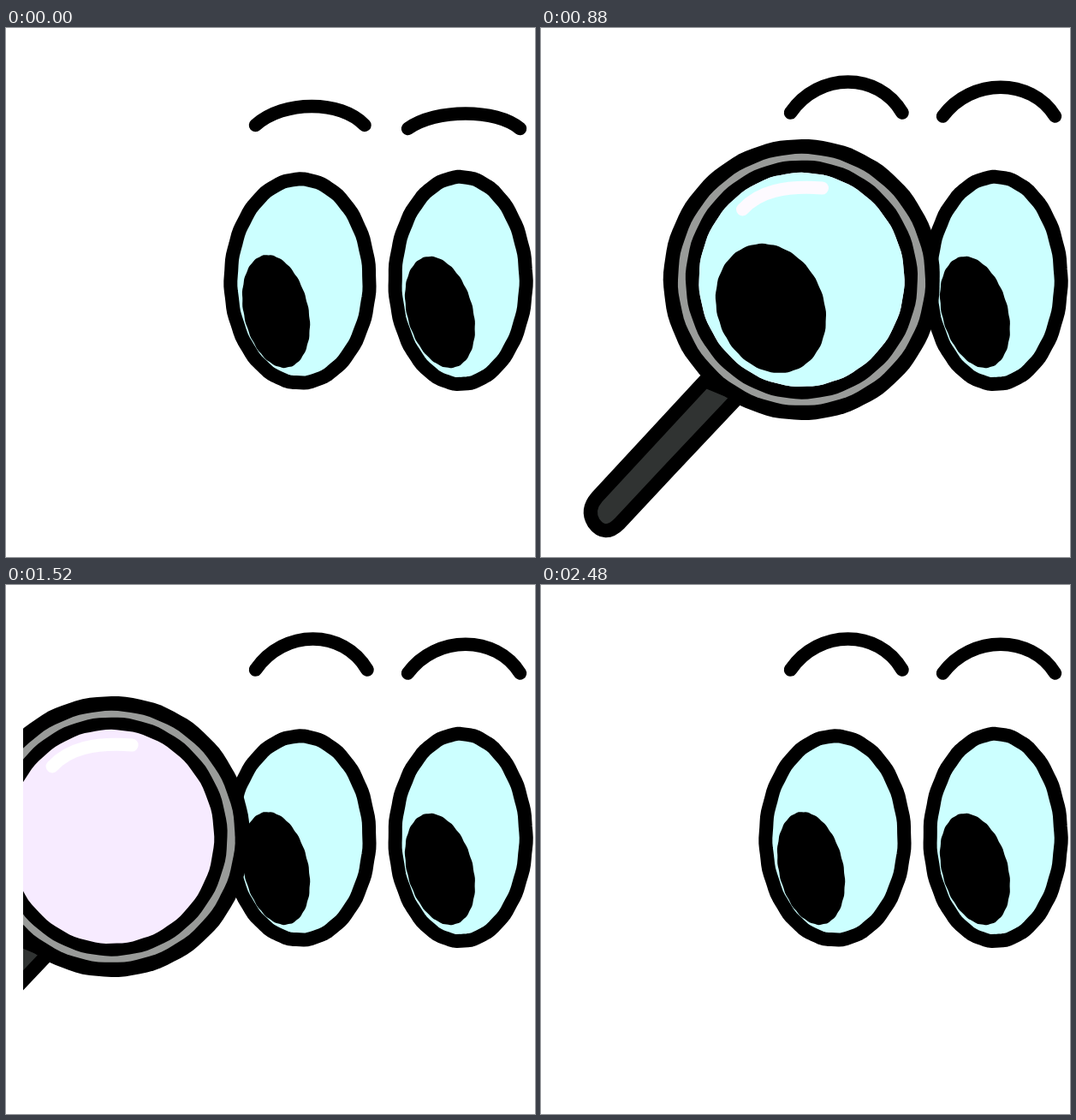
Recreate the animation shown at these times as an HTML page with a canvas. Size 618x618 px, loop 2560 ms.

```html
<!DOCTYPE html>
<html>
<head>
<meta charset="utf-8">
<style>
  html, body { margin: 0; width: 100%; height: 100%; overflow: hidden; background: #fff; }
  canvas { display: block; }
</style>
</head>
<body>
<canvas id="stage" width="618" height="618"></canvas>
<script>
const ctx = document.getElementById('stage').getContext('2d');
const STEP = 80, STEPS = 32, TRAVEL = 45.35;
const CYAN = '#ccffff', LILAC = '#f7ebff', GRAY = '#999b99', DARK = '#303332';
const mix = (a, b, k) => a + (b - a) * k;

// Ellipse with a faint hand-drawn wobble
function oval(cx, cy, rx, ry, tilt = 0) {
  const path = new Path2D(), c = Math.cos(tilt), s = Math.sin(tilt);
  for (let i = 0; i < 120; i++) {
    const a = i * Math.PI / 60;
    const w = 0.3 * Math.sin(23 * a + rx);
    const x = (rx + w) * Math.cos(a), y = (ry + w) * Math.sin(a);
    path.lineTo(cx + x * c - y * s, cy + x * s + y * c);
  }
  path.closePath();
  return path;
}

// Closed curve rounded through the midpoints of its corners
function blob(points) {
  const path = new Path2D(), n = points.length;
  for (let i = 0; i <= n; i++) {
    const [x, y] = points[i % n], [nx, ny] = points[(i + 1) % n];
    const mx = (x + nx) / 2, my = (y + ny) / 2;
    if (i) path.quadraticCurveTo(x, y, mx, my);
    else path.moveTo(mx, my);
  }
  path.closePath();
  return path;
}

function paint(path, fill, stroke, width) {
  if (fill) { ctx.fillStyle = fill; ctx.fill(path); }
  if (stroke) { ctx.strokeStyle = stroke; ctx.lineWidth = width; ctx.stroke(path); }
}

const eyes = [
  [oval(343.5, 295.5, 81, 119), oval(315.5, 331, 37.6, 67, -0.22)],
  [oval(531, 295, 76.5, 121), oval(507, 332, 38.2, 66.7, -0.27)]
];
const handle = new Path2D('M-113 118L-239 254Q-252 269-243 284Q-230 302-213 285L-156 224L-72 135Z');
const rings = [[161.5, 164, '#000'], [144.5, 147, GRAY], [135.5, 139.5, '#000'], [120, 125, LILAC]]
  .map(([rx, ry, color]) => [oval(0, 0, rx, ry), color]);
const lens = rings[3][0];
const shine = new Path2D('M-69-82C-50-103-20-110 24-107');
const squeezedEye = [
  [-122, 0], [-110, -38], [-90, -69], [-62, -65], [-62, -36], [-75, -4],
  [-67, 34], [-52, 74], [-56, 103], [-73, 119], [-110, 108], [-135, 50]
];

function brow(x1, x2, endY, bendY) {
  paint(new Path2D(`M${x1} ${endY}C${x1 + 33} ${bendY} ${x2 - 28} ${bendY} ${x2} ${endY}`), null, '#000', 15.5);
}

function drawBrows(step) {
  const pose = [0, 1, 2, 1][step % 4];
  const endY = [113.5, 99, 85][pose];
  brow(291.5, [419, 422, 423][pose], endY, [84, 51, 11][pose]);
  brow(469.5, 600.5, endY + 4, [94, 58, 20][pose]);
}

// zoom: 0 = eye squeezed at the left rim, 1 = eye fills the lens
function drawMagnifiedEye(zoom) {
  const outline = squeezedEye.map(([x, y], i) => {
    const a = Math.PI + i * Math.PI / 6;
    return [mix(x, 165 * Math.cos(a), zoom), mix(y, 165 * Math.sin(a), zoom)];
  });
  paint(blob(outline), CYAN, '#000', 15);
  paint(oval(mix(-110, -36, zoom), mix(59, 33.5, zoom), mix(34, 62, zoom), mix(50, 77.5, zoom), mix(-0.3, -0.39, zoom)), '#000');
}

function drawGlass(step) {
  const pos = Math.min(step, 25 - step, 10);
  const zoom = (pos - 8) / 2;
  ctx.save();
  ctx.beginPath();
  ctx.rect(20, 0, 598, 618);
  ctx.clip();
  ctx.translate(304.5 - TRAVEL * (10 - pos), 294);
  paint(handle, DARK, '#000', 16);
  for (const [path, color] of rings) paint(path, color);
  ctx.clip(lens);
  if (zoom >= 0) drawMagnifiedEye(zoom);
  let glow = '#fff';
  if (zoom >= 0 && zoom < 1) {
    glow = ctx.createLinearGradient(-69, 0, 24, 0);
    glow.addColorStop(0, '#faf3ff');
    glow.addColorStop(0.4, '#fcf8ff');
    glow.addColorStop(0.6, '#fff');
  } else if (zoom === 1) glow = '#fdfaff';
  paint(shine, null, glow, 15);
  ctx.restore();
}

function draw(now) {
  const step = Math.floor(now / STEP) % STEPS;
  ctx.fillStyle = '#fff';
  ctx.fillRect(0, 0, 618, 618);
  ctx.lineCap = ctx.lineJoin = 'round';
  for (const [white, pupil] of eyes) {
    paint(white, CYAN, '#000', 16);
    paint(pupil, '#000');
  }
  drawBrows(step);
  drawGlass(step);
}

const start = performance.now();
function tick() {
  draw(performance.now() - start);
  requestAnimationFrame(tick);
}
tick();
</script>
</body>
</html>
```
